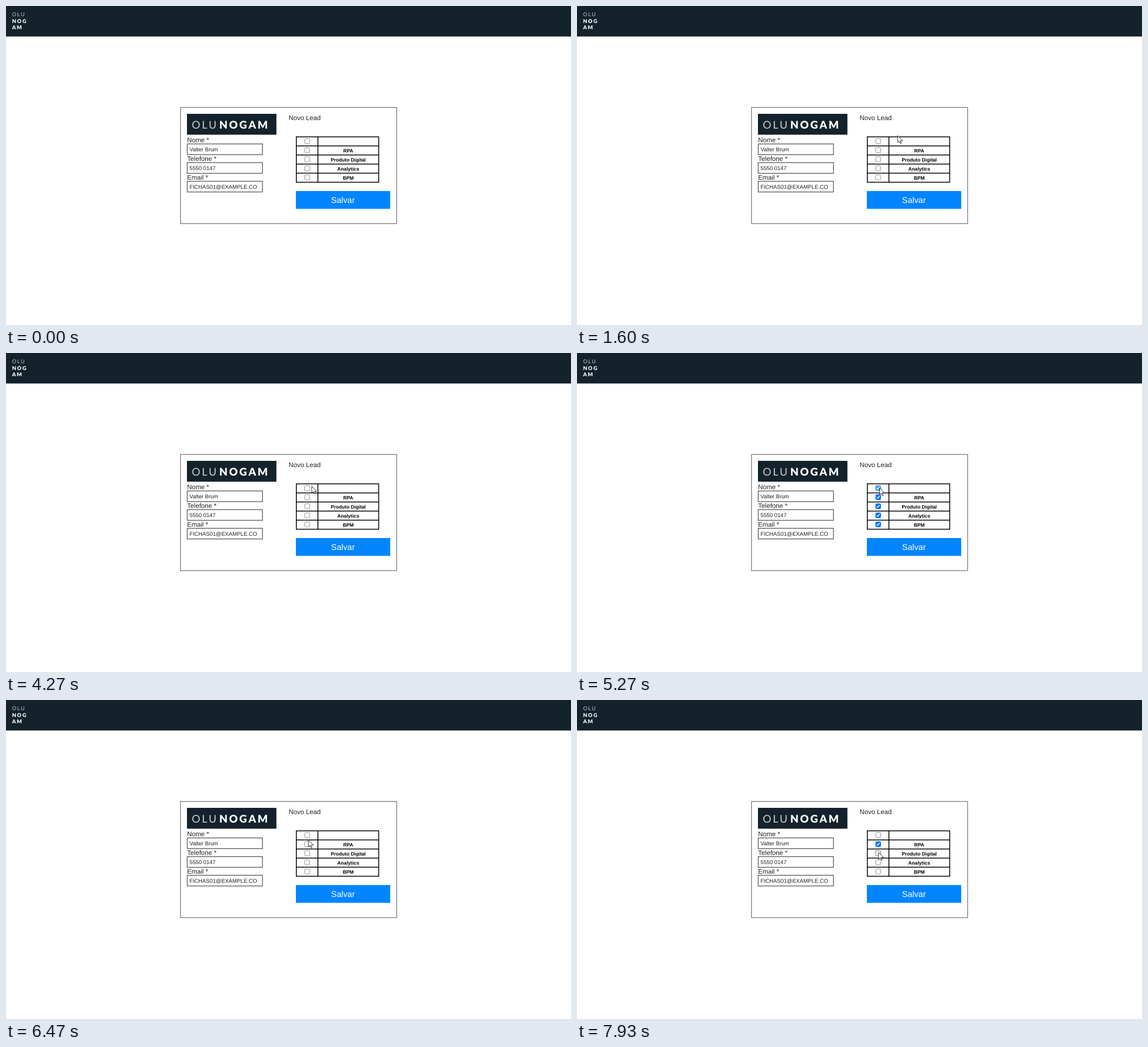
An HTML page that plays this animation: 996x562 px, repeating every 8000 ms.

```html
<!DOCTYPE html>
<html lang="pt">
<head>
<meta charset="utf-8">
<title>Novo Lead</title>
<style>
  html, body { margin: 0; width: 100%; height: 100%; overflow: hidden; background: #fff; }
  svg { display: block; width: 100%; height: 100%; }
  text {
    font-family: "Liberation Sans", Arial, sans-serif;
    text-rendering: geometricPrecision;
    white-space: pre;
  }
  .label { font-size: 11.7px; fill: #212529; }
  .value { font-size: 9.7px; fill: #222; }
  .cell { font-size: 8.65px; font-weight: 700; text-anchor: middle; fill: #000; }
  .save { font-size: 14.8px; text-anchor: middle; fill: #fff; }
  .brand { font-family: Lato, sans-serif; font-weight: 900; fill: #fff; }
  .thin { font-weight: 400; fill: #c9cfd2; }
  .big { font-size: 18.7px; letter-spacing: 2.8px; }
  .small { font-size: 9.3px; letter-spacing: 1.7px; }
</style>
</head>
<body>
<svg id="stage" viewBox="0 0 996 562"></svg>
<script>
const LOOP = 8000;
const STEP = 1000 / 15;
const ROW = 16;
const stage = document.getElementById("stage");

function add(name, attrs, text) {
  const el = document.createElementNS("http://www.w3.org/2000/svg", name);
  for (const key in attrs) el.setAttribute(key, attrs[key]);
  if (text) el.textContent = text;
  stage.appendChild(el);
  return el;
}
const box = (x, y, width, height, attrs) => add("rect", { x, y, width, height, ...attrs });
const label = (x, y, cls, text) => add("text", { x, y, class: cls }, text);

// Header
box(0, 0, 996, 53.7, { fill: "#13222b" });
["OLU", "NOG", "AM"].forEach((line, i) =>
  label(10.7, 18.4 + i * 11.4, i ? "brand small" : "brand small thin", line));

// Card and form
box(307.6, 178.7, 381, 204.7, { fill: "#fff", stroke: "#747b82", "stroke-width": 1.3 });
box(319, 190, 157.7, 36.7, { fill: "#13222b" });
label(327.5, 215.9, "brand big thin", "OLU");
label(376, 215.9, "brand big", "NOGAM");
label(498.3, 200.6, "label", "Novo Lead");

[["Nome *", "Valter Brum"], ["Telefone *", "5550 0147"], ["Email *", "FICHAS01@EXAMPLE.CO"]]
  .forEach(([name, value], i) => {
    const y = 243 + i * 32.9;
    label(319.2, y - 2.7, "label", name);
    box(319.5, y, 132.6, 18.8, { fill: "#fff", stroke: "#626262", "stroke-width": 1.4 });
    label(323.5, y + 13.4, "value", value);
  });

// Table
let grid = "";
for (let i = 0; i < 6; i++) grid += `M511 ${230.5 + i * ROW}H657.7`;
for (const x of [511.8, 549.8, 657]) grid += `M${x} 229.8V311.2`;
add("path", { d: grid, stroke: "#000", "stroke-width": 1.5, fill: "none" });
["RPA", "Produto Digital", "Analytics", "BPM"].forEach((text, i) =>
  label(603.3, 258.3 + i * ROW, "cell", text));

const checks = Array.from({ length: 5 }, (_, i) => {
  const y = 238 + i * ROW;
  return {
    y,
    frame: box(526.6, y - 4.4, 8.8, 8.8, { rx: 1.7, "stroke-width": 0.9 }),
    tick: add("path", {
      d: `M528.5 ${y}l1.7 1.8 3.4-4.2`,
      fill: "none", stroke: "#fff", "stroke-width": 1.4
    })
  };
});

box(511, 326, 166.3, 31.4, { fill: "#0085ff" });
label(594, 347, "save", "Salvar");

const pointer = add("path", {
  d: "M0 0V12.3L2.8 9.7 4.7 14 6.6 13.2 4.7 9.1H8.6Z",
  fill: "#fff", stroke: "#000", "stroke-width": 0.8
});

const linear = p => p;
const easeOut = p => 1 - (1 - p) ** 3;

// The pointer rests between legs
const entry = { x: 899, y: 258 };
const legs = [
  { from: 930, to: 1330, x: 639.7, y: 231.5, ease: easeOut },
  { from: 1400, to: 1600, x: 565.3, y: 228.3 },
  { from: 1600, to: 2070, x: 540.5, y: 233.8, ease: easeOut },
  { from: 4200, to: 4330, x: 537.5, y: 235.5 },
  { from: 4400, to: 4530, x: 533.5, y: 237.5 },
  { from: 6200, to: 6470, x: 533.1, y: 246.7 },
  { from: 6600, to: 6670, x: 533, y: 249.4 },
  { from: 6800, to: 7130, x: 532.5, y: 262.8 },
  { from: 7270, to: 7600, x: 547, y: 291 },
  { from: 7600, to: 7930, x: 531.6, y: 268.3 }
];
const allClicks = [4730, 5270, 5730, 6130];
const rowClicks = [6730];

function pointerAt(t) {
  let { x, y } = entry;
  for (const leg of legs) {
    if (t < leg.from) break;
    const k = (leg.ease || linear)(Math.min(1, (t - leg.from) / (leg.to - leg.from)));
    x += (leg.x - x) * k;
    y += (leg.y - y) * k;
  }
  return { x, y };
}

const toggled = (clicks, t) => clicks.filter(c => c <= t).length % 2 === 1;
const pressed = (clicks, t) => clicks.some(c => t >= c - 65 && t < c);

function paint({ frame, tick }, on, hover, press) {
  const blue = press ? "#4a9bf5" : hover ? "#005cc8" : "#0075ff";
  const line = press ? "#a0a0a0" : hover ? "#606060" : "#858585";
  frame.setAttribute("fill", on ? blue : press ? "#f3f3f3" : "#fff");
  frame.setAttribute("stroke", on ? blue : line);
  tick.setAttribute("visibility", on ? "visible" : "hidden");
}

function draw(time) {
  const t = Math.floor((time + 5) / STEP) * STEP;
  const { x, y } = pointerAt(t);
  const all = toggled(allClicks, t);

  checks.forEach((check, i) => {
    const on = all || (i === 1 && toggled(rowClicks, t));
    const hover = Math.abs(x - 531) < 5 && Math.abs(y - check.y) < 6.5;
    paint(check, on, hover, hover && pressed([...allClicks, ...rowClicks], t));
  });

  pointer.setAttribute("visibility", t >= legs[0].from ? "visible" : "hidden");
  pointer.setAttribute("transform", `translate(${x} ${y})`);
}

const start = performance.now();
function frame() {
  draw((performance.now() - start) % LOOP);
  requestAnimationFrame(frame);
}
frame();
</script>
</body>
</html>
```
